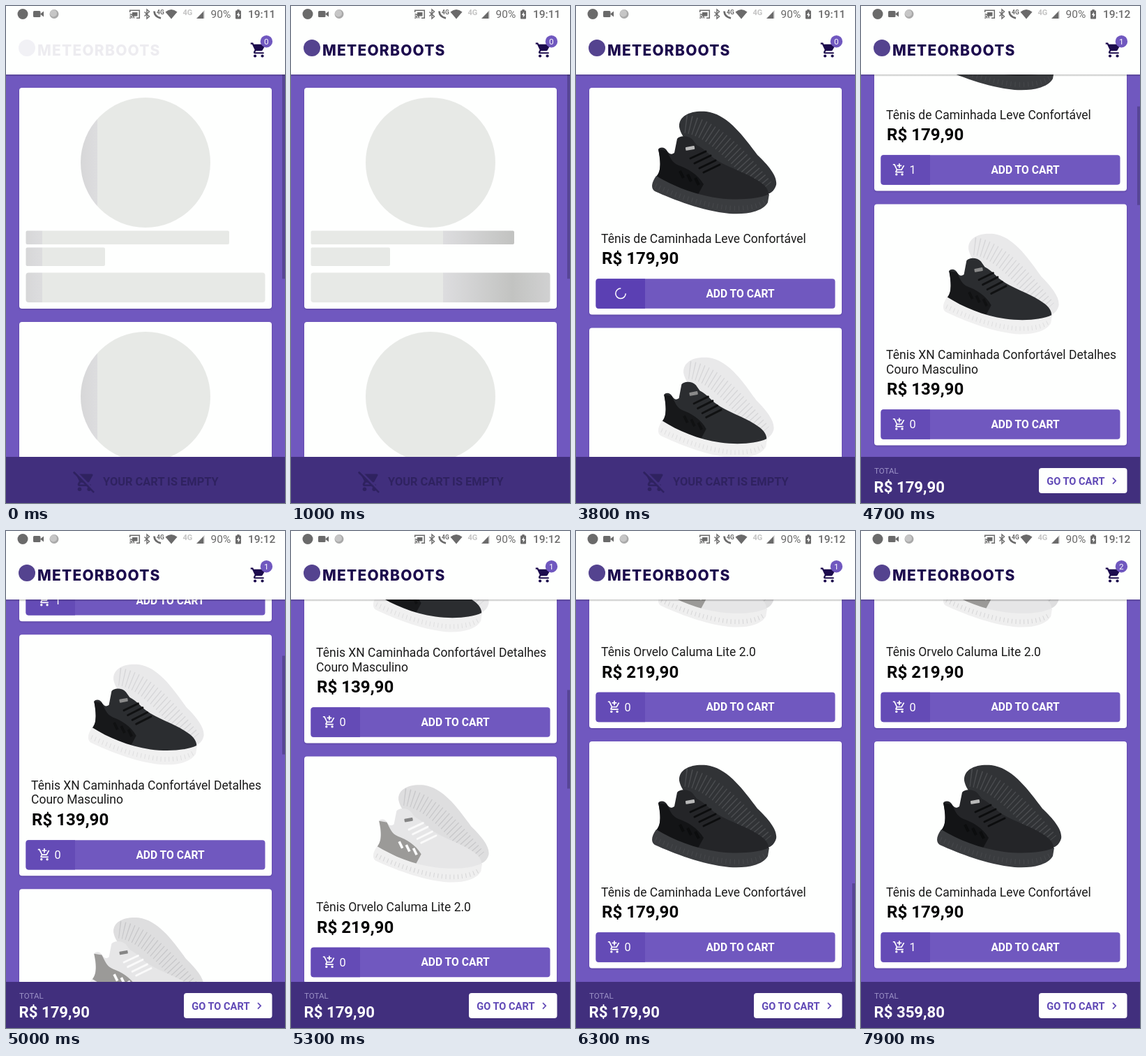
An HTML page for the animation above (8000 ms loop, 400 by 711 pixels).

```html
<!DOCTYPE html>
<html lang="pt-BR">
<head>
<meta charset="utf-8">
<title>Shoe store</title>
<style>
  html, body { margin: 0; width: 100%; height: 100%; overflow: hidden; background: #7058bf; }
  svg { display: block; width: 400px; height: 711px; font-family: Roboto, Arial, sans-serif; }
  .b { font-weight: 700; }
  .card { fill: #fefffe; filter: drop-shadow(0 1px 1px rgba(30, 10, 80, .28)); }
</style>
</head>
<body>
<svg id="stage" viewBox="0 0 400 711" xmlns="http://www.w3.org/2000/svg"></svg>
<script>
const LOOP = 8000, STEP = 100;
const VIEW = { top: 98, h: 547 };
const LOADED = 2400, FIRST_ADD = [3100, 4000], SECOND_ADD = [6800, 7600];
const PURPLE = '#7058bf', INK = '#1c0b4d', FOOT = '#412f7d', DIM = '#2f2260', GREY = '#6a6a6a';

// time, scroll offset
const SCROLL = [[4200, 0], [4700, 177], [5300, 502], [5800, 1080], [6200, 1574.5]];

const WALK = {
  title: ['Tênis de Caminhada Leve Confortável'], price: 'R$ 179,90', fit: '',
  upper: '#242528', heel: '#131416', sole: '#3a3c3f', under: '#313336', groove: '#4b4d50', lace: '#0c0d0e', tab: '#b9b9b9'
};
const LEATHER = {
  title: ['Tênis XN Caminhada Confortável Detalhes', 'Couro Masculino'], price: 'R$ 139,90',
  fit: 'translate(9 9) scale(.93 .98)',
  upper: '#2b2d30', heel: '#17181a', sole: '#f0f0f0', under: '#e9e9ea', groove: '#d6d6d8', lace: '#101112', tab: '#8a8a8a'
};
const LITE = {
  title: ['Tênis Orvelo Caluma Lite 2.0'], price: 'R$ 219,90', fit: 'translate(9 8) scale(.93 .95)',
  upper: '#e6e6e7', heel: '#9b9a98', sole: '#efefef', under: '#dededf', groove: '#c8c8ca', lace: '#fafafa', tab: '#858585'
};
const products = [WALK, LEATHER, LITE, LEATHER, LITE, WALK];

const text = (x, y, size, fill, str, attrs = '') =>
  `<text x="${x}" y="${y}" font-size="${size}" fill="${fill}" ${attrs}>${str}</text>`;
const box = (x, y, w, h, fill, r = 0, attrs = '') =>
  `<rect x="${x}" y="${y}" width="${w}" height="${h}" rx="${r}" fill="${fill}" ${attrs}/>`;
const path = (d, fill) => `<path d="${d}" fill="${fill}"/>`;
const line = (d, color, w, attrs = '') =>
  `<path d="${d}" fill="none" stroke="${color}" stroke-width="${w}" ${attrs}/>`;
const dot = (x, y, r, fill) => `<circle cx="${x}" cy="${y}" r="${r}" fill="${fill}"/>`;

const wheels = color => dot(7, 20, 2, color) + dot(17, 20, 2, color);
const cart = color => wheels(color) +
  path('M1 2h3.3l.9 2H20c.8 0 1.2.8.9 1.5l-3.6 6.5c-.3.6-1 1-1.7 1H8.1l-.9 1.8.2.2H19v2H7c-1.5 0-2.5-1.6-1.8-3l1.4-2.4L3 4H1z', color);
const addCart = wheels('#fff') +
  line('M1 3h2.6L7.9 12h7.9l4.2-7.4M7.9 12l-1.7 3q-.5 1 .8 1H19M12 1v8M8 5h8', '#fff', 2);
const noCart = cart(DIM) + line('M2 .6L24 22.6', FOOT, 2) + line('M.6 1.9L22.1 23.4', DIM, 1.8);

function shoe(p) {
  return `<g transform="${p.fit}">
    ${path('M41 42C40 26 57 18 80 20C110 24 132 54 153 82C170 98 182 113 180 125C176 139 163 141 155 136L80 80C60 74 44 58 41 42Z', p.under)}
    ${line('M50 38C86 42 124 82 163 129', p.groove, 26, 'stroke-dasharray="1.4 5"')}
    ${path('M11 74C14 70 21 71 24 77C27 81 30 82 34 79L38 59C42 54 54 54 60 60L66 68C78 74 84 82 91 87C108 99 133 106 151 117C163 124 170 131 169 140L155 148C123 152 83 149 43 138L9 120C14 106 15 94 11 74Z', p.upper)}
    ${path('M11 74C16 95 14 106 8 113L66 142L76 124C68 110 52 101 40 97C30 93 28 85 23 76Z', p.heel)}
    ${path('M8 112C1 122 0 130 6 134C33 146 73 162 113 166C143 168 162 161 168 150L170 138C153 146 123 147 98 144C63 139 33 127 8 112Z', p.sole)}
    ${line('M7 126C40 142 78 154 113 158Q146 160 164 149', p.groove, 7, 'stroke-dasharray="1.2 5" opacity=".6"')}
    ${line('M57 87l22-10M63 94l23-11M70 101l23-11M76 107l23-11', p.lace, 3, 'stroke-linecap="round"')}
    ${line('M42 105l5 10M53 110l5 10M64 115l5 10', p.lace, 4)}
    ${box(50, 70, 13, 5, p.tab, 1, 'transform="rotate(-10 56 72)"')}
  </g>`;
}

function card(p, i, top) {
  const extra = (p.title.length - 1) * 20.5, btn = 273.3 + extra;
  return `<g transform="translate(0 ${top})">
    ${box(19, 0, 362, 324.5 + extra, '#fefffe', 4, 'class="card"')}
    <g class="photo" transform="translate(107 14)">${shoe(p)}</g>
    ${p.title.map((s, n) => text(36.1, 221.5 + n * 20.5, 17.5, '#1b1b1b', s)).join('')}
    ${text(37, 252.3 + extra, 24.1, '#000', p.price, 'class="b"')}
    <g transform="translate(0 ${btn})">
      ${box(28.5, 0, 343, 42.4, PURPLE, 4)}
      <path id="side${i}" d="M99 0H32.5a4 4 0 0 0-4 4V38.4a4 4 0 0 0 4 4H99z"/>
      <g id="amount${i}">
        <g transform="translate(45 11) scale(.83)">${addCart}</g>
        ${text(69.5, 27, 16.3, '#fff', 0, `id="count${i}"`)}
      </g>
      <circle id="spin${i}" cx="64" cy="21" r="7.2" fill="none" stroke="#fff" stroke-width="1.5" stroke-dasharray="34 11.24"/>
      ${text(235.5, 26.7, 15.6, '#fff', 'ADD TO CART', 'class="b" text-anchor="middle"')}
    </g>
  </g>`;
}

const skeleton = top => `<g transform="translate(0 ${top})">
  ${box(19, 0, 362, 316, '#fefffe', 4, 'class="card"')}
  ${dot(200, 107, 93, 'url(#shineDisc)')}
  ${box(28.5, 204.5, 291.5, 19.5, 'url(#shineBar)', 2)}
  ${box(28.5, 228.5, 113.5, 26.5, 'url(#shineBar)', 2)}
  ${box(28.5, 264.5, 343, 42.5, 'url(#shineBar)', 4)}
</g>`;

const shine = id => `<linearGradient id="${id}" gradientUnits="userSpaceOnUse" y1="0" y2="0">` +
  [[0, '#e7e9e6'], [0, '#dddddf'], [.5, '#c2c3c1'], [1, '#dddddf'], [1, '#e7e9e6']]
    .map(([o, c]) => `<stop offset="${o}" stop-color="${c}"/>`).join('') + '</linearGradient>';

const statusBar = [
  dot(24, 11.5, 7.5, GREY),
  box(39, 7, 10.5, 9, GREY, 1.5), path('M49 11.5l5-4v8z', GREY),
  dot(69, 11.5, 6.5, '#a9a9a9'), dot(68, 10.5, 5, '#c6c6c6'),
  line('M177.7 9V6.2H191.3V17.3H187M177.5 11.5a6 6 0 0 1 6 6M177.5 14.3a3.2 3.2 0 0 1 3.2 3.2', GREY, 1.5),
  dot(178.2, 17, 1, GREY), box(181, 9, 7.5, 5.5, GREY),
  line('M198.5 8.5l7 6.5-3.5 3V5l3.5 3-7 6.5', GREY, 1.4),
  line('M212.5 7.5q.5 8 9.5 9.8', GREY, 2.8),
  text(216, 12, 8.5, GREY, '4G', 'class="b"'),
  path('M228.5 8.5q8.5-7 17 0L237 18.5z', GREY),
  text(253.5, 12.5, 11, '#c4c4c4', '4G', 'class="b"'),
  path('M284.5 6v12h-12z', '#bdbdbd'), path('M283 8v10h-9.5z', GREY),
  text(293.5, 17.3, 15.5, GREY, '90%'),
  box(329, 6.5, 8, 12, GREY, 1), box(331.3, 5, 3.4, 2, GREY),
  path('M333.8 8.5l-3 4.5h2v3.5l3-4.7h-2z', '#fff'),
  text(347, 17.3, 15.5, GREY, '', 'id="clock" font-weight="500"')
].join('');

const tops = [];
let y = 117;
for (const p of products) {
  tops.push(y);
  y += 343.5 + (p.title.length - 1) * 20.5;
}
const listHeight = y - VIEW.top, skeletonHeight = 19 + 3 * 335;

document.getElementById('stage').innerHTML = `
  <defs>
    ${shine('shineBar')}${shine('shineDisc')}
    <linearGradient id="shade" x2="0" y2="1">
      <stop stop-color="#000" stop-opacity=".25"/><stop offset="1" stop-color="#000" stop-opacity="0"/>
    </linearGradient>
  </defs>
  ${box(0, 0, 400, 711, PURPLE)}
  <g id="skeleton">${skeleton(117)}${skeleton(452)}</g>
  <g id="list">${products.map((p, i) => card(p, i, tops[i])).join('')}</g>
  ${box(396, 98, 4, 0, '#574596', 0, 'id="thumb"')}
  ${box(0, 98, 400, 3, 'url(#shade)')}
  ${box(0, 0, 400, 98, '#fefffe')}
  ${statusBar}
  <g id="logo">
    ${dot(30, 60, 12, '#54438f')}
    ${text(45, 71, 21, INK, 'METEORBOOTS', 'font-family="Inter, sans-serif" font-weight="800" letter-spacing="1.2"')}
  </g>
  <g transform="translate(349.7 50.5) scale(1.05)">${cart(INK)}</g>
  ${dot(373.4, 50.7, 8.7, PURPLE)}
  ${text(373.4, 54.8, 11.7, '#fff', 0, 'id="badge" text-anchor="middle"')}
  ${box(0, 645, 400, 66, FOOT)}
  <g id="empty">
    <g transform="translate(96 664) scale(1.36)">${noCart}</g>
    ${text(139, 685.7, 16.4, DIM, 'YOUR CART IS EMPTY', 'class="b"')}
  </g>
  <g id="summary">
    ${text(19, 669.2, 11.5, '#9d93c8', 'TOTAL')}
    ${text(18.5, 696, 22.2, '#fff', '', 'id="total" class="b"')}
    ${box(255, 661, 126.5, 36, '#fefffe', 4)}
    ${text(266.3, 685, 14.6, '#6049b6', 'GO TO CART', 'class="b"')}
    ${line('M361 675l4.2 4.3-4.2 4.3', '#6049b6', 1.7)}
  </g>`;

const el = id => document.getElementById(id);
const set = (id, name, value) => el(id).setAttribute(name, value);
const show = (id, on) => set(id, 'display', on ? 'inline' : 'none');
const write = (id, value) => { el(id).textContent = value; };
const clamp = (v, lo, hi) => Math.min(hi, Math.max(lo, v));
const photos = document.querySelectorAll('.photo');

// Smooth curve through the scroll points, at rest at both ends.
function scrollAt(t) {
  const last = SCROLL.length - 1;
  if (t <= SCROLL[0][0]) return 0;
  if (t >= SCROLL[last][0]) return SCROLL[last][1];
  const slope = k => k === 0 || k === last ? 0 :
    (SCROLL[k + 1][1] - SCROLL[k - 1][1]) / (SCROLL[k + 1][0] - SCROLL[k - 1][0]);
  const k = SCROLL.findIndex(p => p[0] > t) - 1;
  const [t0, a] = SCROLL[k], [t1, b] = SCROLL[k + 1];
  const d = t1 - t0, u = (t - t0) / d, v = 1 - u;
  return a * v * v * (1 + 2 * u) + b * u * u * (3 - 2 * u) + d * u * v * (slope(k) * v - slope(k + 1) * u);
}

function render(t) {
  const loaded = t >= LOADED, scroll = scrollAt(t);
  const bought = [FIRST_ADD, SECOND_ADD].filter(a => t >= a[1]).length;

  set('logo', 'opacity', clamp(.07 + t / 300, 0, 1));
  const left = -176 + 365 * Math.min(t / 900, 1);
  for (const [id, x] of [['shineBar', 28.5], ['shineDisc', 107]]) {
    set(id, 'x1', x + left);
    set(id, 'x2', x + left + 200);
  }

  show('skeleton', !loaded);
  show('list', loaded);
  set('list', 'transform', `translate(0 ${-scroll})`);
  photos.forEach(p => p.setAttribute('opacity', t < LOADED + STEP ? .5 : 1));

  const ratio = VIEW.h / (loaded ? listHeight : skeletonHeight);
  set('thumb', 'y', VIEW.top + scroll * ratio);
  set('thumb', 'height', VIEW.h * ratio);
  show('thumb', t < 1700 || (t > SCROLL[0][0] && t < 6700));

  products.forEach((p, i) => {
    const add = i === 0 ? FIRST_ADD : i === 5 ? SECOND_ADD : [LOOP, LOOP];
    const busy = t >= add[0] && t < add[1];
    show('amount' + i, !busy);
    show('spin' + i, busy);
    set('spin' + i, 'transform', `rotate(${(t - 3800) * .36} 64 21)`);
    set('side' + i, 'fill', busy ? '#5b40b3' : '#644bb6');
    write('count' + i, t >= add[1] ? 1 : 0);
  });

  write('clock', bought ? '19:12' : '19:11');
  write('badge', bought);
  show('empty', !bought);
  show('summary', bought);
  write('total', 'R$ ' + (bought * 179.9).toFixed(2).replace('.', ','));
}

const start = performance.now();
function tick() {
  const ms = performance.now() - start;
  // The screen refreshes ten times a second.
  render(Math.floor((ms + 2) / STEP) * STEP % LOOP);
  requestAnimationFrame(tick);
}
tick();
</script>
</body>
</html>
```
